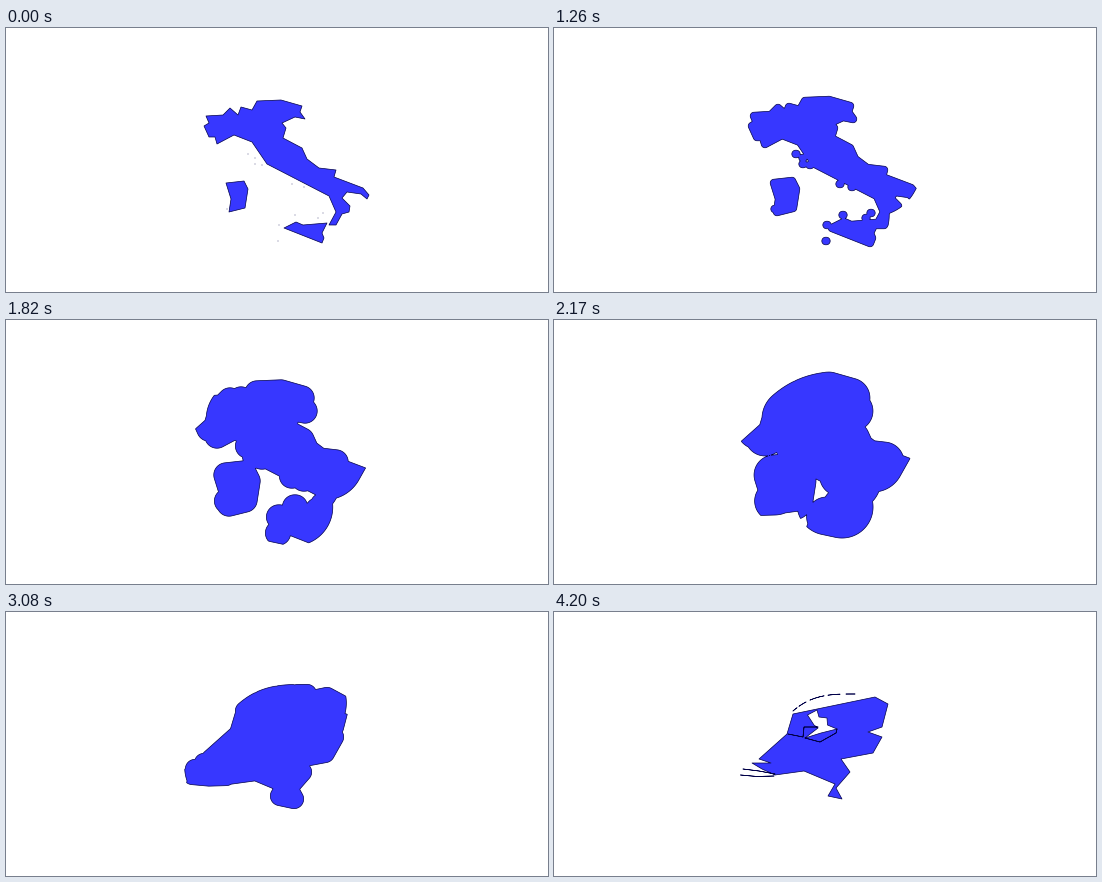
Recreate the animation shown at these times as a matplotlib script. Size 542x264 px, loop 4830 ms.

```python
import numpy as np
import matplotlib.pyplot as plt
from matplotlib.animation import FuncAnimation
from matplotlib.patches import PathPatch
from matplotlib.path import Path

W, H = 542, 264
TICK, TICKS, STEPS = 70, 69, 52
REACH = 51    # Hausdorff distance between the two maps, in pixels
MARGIN = 0.4  # keeps hairline parts visible on the sampling grid


def ring(text):
    """Parse "x,y x,y ..." into an array of points."""
    return np.array([p.split(",") for p in text.split()], float)


def thread(pts):
    """A line without area: out along the points and back again."""
    return np.concatenate([pts, pts[-2:0:-1]])


def islet(x, y):
    return thread(np.array([(x - 0.4, y), (x + 0.4, y)]))


def barrier_island(x0, x1):
    """A piece of the curved island chain north of the Dutch coast."""
    x = np.linspace(x0, x1, 5)
    return thread(np.column_stack([x, 82 + 17 * ((301 - x) / 62) ** 3.2]))


ITALY = [
    ring("198,98 203,95 200,88 217,87 224,80 232,87 235,79 246,82 251,73 275,72 "
         "296,78 294,84 299,91 289,89 276,95 280,100 277,110 296,120 301,131 "
         "313,140 330,142 328,149 357,160 363,167 361,171 355,166 341,164 336,170 "
         "344,178 343,184 336,186 330,197 323,197 330,184 323,168 261,136 246,114 "
         "228,107 211,116 209,109 203,109"),
    ring("278,200 290,194 297,197 321,195 316,205 318,210 316,215"),
    ring("220,155 238,153 242,161 239,180 223,184 225,171"),
] + [islet(x, y) for x, y in ring("242,126 249,130 249,136 256,137 286,156 298,159 "
                                  "289,187 312,190 317,185 273,197 272,213 221,181")]

NETHERLANDS = [
    ring("205,147 233,122 239,102 321,85 334,92 328,115 314,120 328,125 319,141 "
         "287,147 296,160 282,176 288,187 274,184 281,172 250,159 221,163 "
         "208,157 198,151 217,151"),
    # inland sea, wound the other way so that it stays empty
    ring("253.5,103 263,98 265,105 273,106 273.5,113 283,117 267,121 251,126 "
         "264,116 260,113")[::-1],
    thread(ring("234,122 249,125 250,115 264,115")),
    thread(ring("251,126 266,130 282,121 283,117")),
    thread(ring("186.5,163 203,164.5 220,164")),
    thread(ring("189,157 205,159 221,162")),
] + [barrier_island(start, start + length)
     for start, length in [(239, 4), (245, 7), (256, 14), (274, 12), (292, 9)]]


def outline(rings):
    return Path.make_compound_path(
        *[Path(np.vstack([r, r[:1]]), closed=True) for r in rings])


gx, gy = np.arange(170, 371, 0.5), np.arange(40, 236, 0.5)
X, Y = np.meshgrid(gx, gy)
GRID = np.column_stack([X.ravel(), Y.ravel()])


def signed_distance(rings):
    """Distance to the rings on the grid, negative on land."""
    best = np.full(X.shape, np.inf)
    land = np.zeros(X.size, bool)
    for r in rings:
        if len(r) > 2:
            land ^= Path(r).contains_points(GRID)
        for (x0, y0), (x1, y1) in zip(r, np.roll(r, -1, axis=0)):
            dx, dy = x1 - x0, y1 - y0
            t = ((X - x0) * dx + (Y - y0) * dy) / (dx * dx + dy * dy)
            t = np.clip(t, 0, 1)
            best = np.minimum(best, (X - x0 - t * dx) ** 2 + (Y - y0 - t * dy) ** 2)
    return np.sqrt(best) * np.where(land.reshape(X.shape), -1, 1)


START, END = outline(ITALY), outline(NETHERLANDS)
from_start, from_end = signed_distance(ITALY), signed_distance(NETHERLANDS)

fig = plt.figure(figsize=(W / 100, H / 100), dpi=100, facecolor="white")
ax = fig.add_axes([0, 0, 1, 1])
ax.set_xlim(0, W)
ax.set_ylim(H, 0)
ax.axis("off")
shape = ax.add_patch(PathPatch(START, facecolor="#3737ff", edgecolor="#000048",
                               linewidth=0.5, joinstyle="round"))


def ease(t):
    return 2 * t * t if t < 0.5 else 1 - 2 * (1 - t) ** 2


def morph(grow):
    """Both maps widened by complementary radii, then intersected."""
    field = np.maximum(from_start - max(grow, MARGIN),
                       from_end - max(REACH - grow, MARGIN))
    lines = ax.contour(gx, gy, field, levels=[0])
    path = lines.get_paths()[0]
    lines.remove()
    return path


def draw(tick):
    # one early step, a rest on the first map, the morph, a rest on the second
    step = min(max(tick - 8, min(tick, 1)), STEPS)
    grow = REACH * ease(step / STEPS)
    if grow < MARGIN / 2:
        shape.set_path(START)
    elif REACH - grow < MARGIN / 2:
        shape.set_path(END)
    else:
        shape.set_path(morph(grow))
    return [shape]


anim = FuncAnimation(fig, draw, frames=TICKS, interval=TICK, repeat=True,
                     repeat_delay=0, init_func=lambda: [shape])
plt.show()
```
